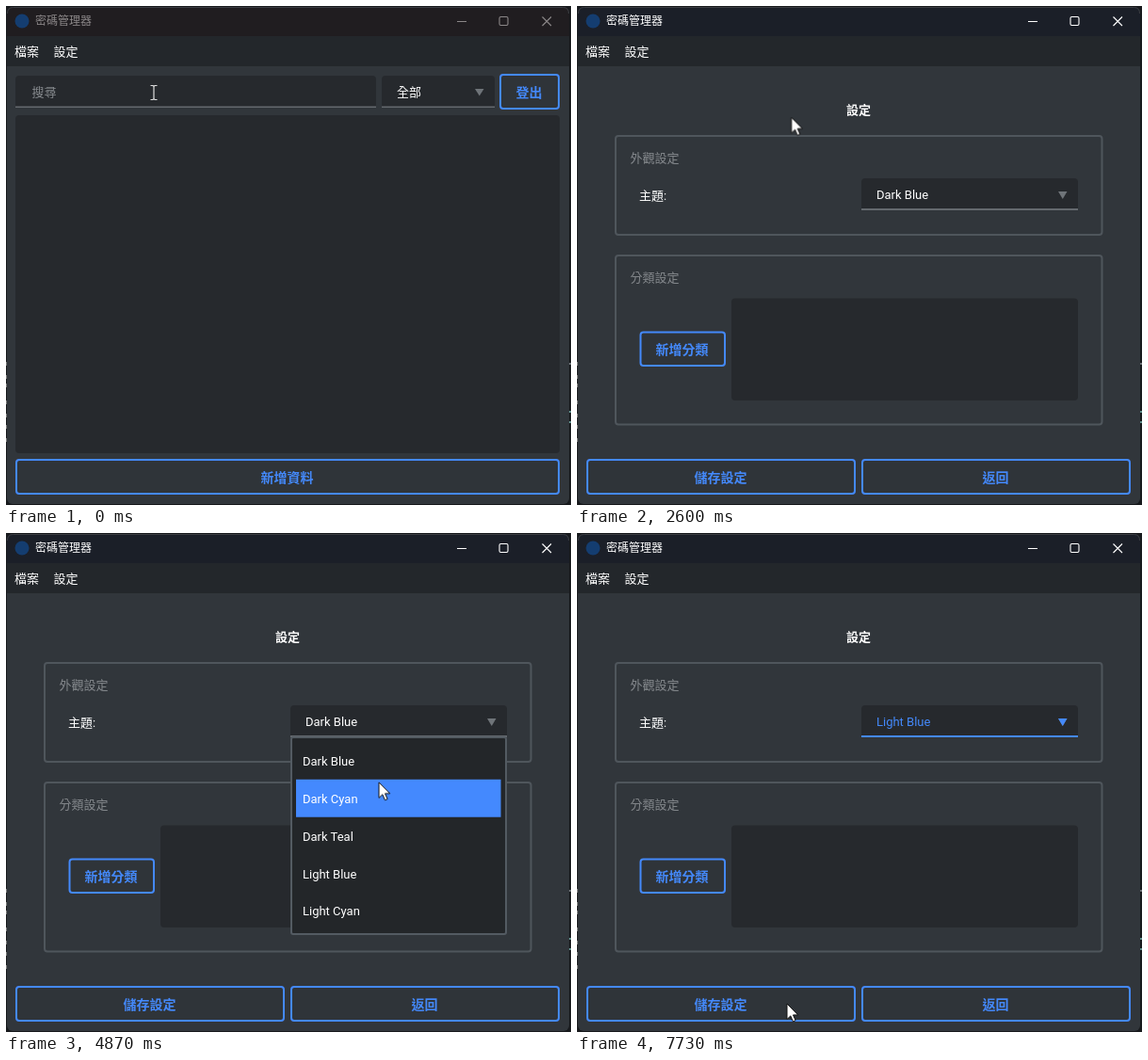
These frames come from a looping animation (600x530 px, 8 s). An HTML page:

```html
<!DOCTYPE html>
<html lang="zh-Hant">
<head>
<meta charset="utf-8">
<title>密碼管理器</title>
<style>
  html, body { margin: 0; width: 100%; height: 100%; overflow: hidden; background: #17191c; }
  svg { display: block; width: 600px; height: 530px; }
  text { font: 13px Roboto, "Noto Sans CJK TC", "Noto Sans CJK", sans-serif; fill: #fff; }
  .bold { font-weight: 700; }
  .mid { text-anchor: middle; }
  .dim { fill: #85898d; }
  .panel { fill: #26292d; }
  .line { fill: #64696e; }
  .arrow { fill: #6f7479; }
  .group { fill: none; stroke: #4f565c; stroke-width: 2; }
  .btn rect { fill: #2f3439; stroke: #4489fb; stroke-width: 2; }
  .btn text { font-size: 14px; font-weight: 700; text-anchor: middle; fill: #4489fb; }
  .hot text, .hot .line, .hot .arrow { fill: #4489fb; }
  .glyphs { fill: none; stroke: #fff; stroke-width: 1.1; }
  .title { font-size: 12px; }
  .idle text { fill: #8b8788; }
  .idle .glyphs { stroke: #8b8788; }

  /* 1% of the loop is 80 ms */
  .t { animation: 8s step-end infinite; }
  .idle { animation-name: idle; }
  .live { animation-name: live; }
  .main { animation-name: main; }
  .prefs { animation-name: prefs; }
  .tab { animation-name: tab; }
  .menu { animation-name: menu; }
  .pick { animation-name: pick; }
  .list { animation-name: list; }
  .row { animation-name: row; }
  .blue { animation-name: blue; }
  .cyanHot { animation-name: cyanHot; }
  .cyan { animation-name: cyan; }
  .light { animation-name: light; }
  .beam { animation-name: beam; }
  .pointer { animation-name: pointer; }
  .move { animation: move 8s linear infinite; }

  @keyframes idle { 0% { visibility: visible } 7.5%, 100% { visibility: hidden } }
  @keyframes live { 0% { visibility: hidden } 7.5%, 100% { visibility: visible } }
  @keyframes main { 0% { visibility: visible } 27.5%, 100% { visibility: hidden } }
  @keyframes prefs { 0% { visibility: hidden } 27.5%, 100% { visibility: visible } }
  @keyframes tab { 0% { visibility: hidden } 5% { visibility: visible } 27.5%, 100% { visibility: hidden } }
  @keyframes menu { 0% { visibility: hidden } 18.375% { visibility: visible } 27.5%, 100% { visibility: hidden } }
  @keyframes pick { 0% { visibility: hidden } 24.2% { visibility: visible } 27.5%, 100% { visibility: hidden } }
  @keyframes list {
    0% { visibility: hidden } 51.6% { visibility: visible } 61.6% { visibility: hidden }
    77.5% { visibility: visible } 80.875%, 100% { visibility: hidden }
  }
  @keyframes row {
    0% { transform: none } 59.1% { transform: translateY(39.75px) }
    78.3% { transform: translateY(79.5px) } 79.1%, 100% { transform: translateY(119.25px) }
  }
  @keyframes blue { 0% { visibility: hidden } 27.5% { visibility: visible } 61.6%, 100% { visibility: hidden } }
  @keyframes cyanHot { 0% { visibility: hidden } 61.6% { visibility: visible } 77.5%, 100% { visibility: hidden } }
  @keyframes cyan { 0% { visibility: hidden } 77.5% { visibility: visible } 80.875%, 100% { visibility: hidden } }
  @keyframes light { 0% { visibility: hidden } 80.875%, 100% { visibility: visible } }
  @keyframes beam { 0% { visibility: visible } 2.5%, 100% { visibility: hidden } }
  @keyframes pointer { 0% { visibility: hidden } 2.5%, 100% { visibility: visible } }
  @keyframes move {
    0%, .875% { transform: translate(157px, 92px) }
    2.5% { transform: translate(128px, 72px) }
    5.2% { transform: translate(70px, 46px) }
    7.5%, 23.375% { transform: translate(63px, 47px) }
    25.8%, 27.4% { transform: translate(84px, 96px) }
    28.375%, 30.8% { transform: translate(88px, 96px) }
    33.4% { transform: translate(300px, 130px) }
    35.9% { transform: translate(463px, 260px) }
    37.8% { transform: translate(420px, 472px) }
    39.3% { transform: translate(250px, 460px) }
    40.875%, 43.3% { transform: translate(175px, 386px) }
    46.6%, 49.1% { transform: translate(399px, 188px) }
    51.6%, 57.4% { transform: translate(401px, 210px) }
    61.6%, 65.87% { transform: translate(395px, 276px) }
    65.875%, 71.62% { transform: translate(395px, 270px) }
    71.625%, 77.4% { transform: translate(406px, 206px) }
    79.1%, 86.62% { transform: translate(404px, 351px) }
    86.625%, 90.87% { transform: translate(398px, 334px) }
    90.875%, 93.3% { transform: translate(377px, 212px) }
    96.6%, 100% { transform: translate(223px, 500px) }
  }
</style>
</head>
<body>
<svg viewBox="0 0 600 530">
  <defs>
    <g id="glyphs">
      <path d="M479 16.5h10M569.5 11.5l9.5 9.5m0-9.5l-9.5 9.5"/>
      <rect x="524" y="11.5" width="9" height="9" rx="1.5"/>
    </g>
    <g id="field">
      <path class="panel" d="M302 217V187q0-4 4-4H528q4 0 4 4V217z"/>
      <rect class="line" x="302" y="215" width="230" height="2"/>
      <path class="arrow" d="M511 197h9.500l-4.750 8z"/>
    </g>
  </defs>

  <!-- window -->
  <rect width="600" height="530" fill="#17191c"/>
  <path d="M0 380h1m-1 14h1m-1 9h1m-1 18h1m-1 14h1m-1 12h1m-1 14h1" stroke="#777" stroke-width="4"/>
  <path d="M598 380h2" stroke="#8a9094" stroke-width="1.500"/>
  <path d="M598 431h2m-2 11h2" stroke="#5f8f8c" stroke-width="2"/>
  <rect x="1" y="1" width="597" height="528" rx="6" fill="#31363b"/>
  <path d="M1 64V32H598V64z" fill="#23272b"/>

  <g class="t idle">
    <path d="M1 32V7q0-6 6-6H592q6 0 6 6V32z" fill="#201d20"/>
    <text class="title" x="31" y="20">密碼管理器</text>
    <use class="glyphs" href="#glyphs"/>
  </g>
  <g class="t live">
    <path d="M1 32V7q0-6 6-6H592q6 0 6 6V32z" fill="#1b1f28"/>
    <text class="title" x="31" y="20">密碼管理器</text>
    <use class="glyphs" href="#glyphs"/>
  </g>
  <path d="M1.500 8q0-6.500 6-6.500H591.500q6 0 6 6.500" fill="none" stroke="#3b3d42"/>
  <circle cx="17" cy="16" r="7.500" fill="#143d70"/>

  <rect class="t tab" x="43" y="32" width="41.500" height="31" fill="#7fb6fc"/>
  <text x="9" y="53">檔案</text>
  <text x="50.500" y="53">設定</text>

  <!-- vault page -->
  <g class="t main">
    <path class="panel" d="M10 108V78q0-4 4-4H389q4 0 4 4V108z"/>
    <rect class="line" x="10" y="106.500" width="383" height="1.500"/>
    <text class="dim" x="27.500" y="96">搜尋</text>
    <path class="panel" d="M399 108V78q0-4 4-4H515q4 0 4 4V108z"/>
    <rect class="line" x="399" y="106.500" width="120" height="1.500"/>
    <text x="415" y="96">全部</text>
    <path class="arrow" d="M498 88h9.500l-4.750 7.500z"/>
    <g class="btn">
      <rect x="525" y="73" width="62" height="36" rx="3"/>
      <text x="555.500" y="97">登出</text>
    </g>
    <rect class="panel" x="10" y="116" width="578" height="359" rx="4"/>
    <g class="btn">
      <rect x="11" y="482" width="576" height="36" rx="3"/>
      <text x="298.500" y="506">新增資料</text>
    </g>
  </g>

  <g class="t menu">
    <rect x="44" y="64.500" width="75" height="44.500" fill="#23272b" stroke="#61778c" stroke-width="1.500"/>
    <rect class="t pick" x="45" y="65.500" width="73" height="42.500" fill="#7fb6fc"/>
    <text x="60" y="92">設定</text>
  </g>

  <!-- settings page -->
  <g class="t prefs">
    <text class="bold mid" x="299" y="115">設定</text>
    <rect class="group" x="41" y="138" width="516.500" height="105" rx="3"/>
    <text class="dim" x="56.500" y="166">外觀設定</text>
    <text x="66" y="206">主題:</text>
    <rect class="group" x="41" y="265" width="516.500" height="179.500" rx="3"/>
    <text class="dim" x="56.500" y="293">分類設定</text>
    <rect class="panel" x="164" y="310.500" width="368" height="108.500" rx="4"/>
    <g class="btn">
      <rect x="67.500" y="346.500" width="89.500" height="35.500" rx="3"/>
      <text x="111.500" y="370">新增分類</text>
      <rect x="11" y="482" width="284" height="36" rx="3"/>
      <text x="152.500" y="506">儲存設定</text>
      <rect x="303" y="482" width="284" height="36" rx="3"/>
      <text x="444.500" y="506">返回</text>
    </g>
  </g>

  <g class="t blue"><use href="#field"/><text x="318" y="204.500">Dark Blue</text></g>
  <g class="t cyan"><use href="#field"/><text x="318" y="204.500">Dark Cyan</text></g>
  <g class="t hot cyanHot">
    <use href="#field"/>
    <rect class="line" x="302" y="215" width="230" height="2"/>
    <path class="arrow" d="M511 197h9.500l-4.750 8z"/>
    <text x="318" y="204.500">Dark Cyan</text>
  </g>
  <g class="t hot light">
    <use href="#field"/>
    <rect class="line" x="302" y="215" width="230" height="2"/>
    <path class="arrow" d="M511 197h9.500l-4.750 8z"/>
    <text x="318" y="204.500">Light Blue</text>
  </g>

  <g class="t list">
    <rect x="303" y="217" width="228" height="209" rx="2" fill="#232629" stroke="#535b62" stroke-width="2"/>
    <rect class="t row" x="308" y="222" width="217.500" height="40" fill="#4489fe"/>
    <text x="315" y="247">Dark Blue</text>
    <text x="315" y="287">Dark Cyan</text>
    <text x="315" y="326.500">Dark Teal</text>
    <text x="315" y="366.500">Light Blue</text>
    <text x="315" y="406">Light Cyan</text>
  </g>

  <g class="move">
    <path class="t beam" d="M-3.500-7.500h2.500l1 1l1-1h2.500M0-7V7M-3.500 7.500h2.500l1-1l1 1h2.500" fill="none" stroke="#ddd" stroke-width="1.200"/>
    <path class="t pointer" d="M0 0V16.500l3.800-3.600 2.600 6 2.700-1.200-2.600-5.800h5.200z" fill="#fff" stroke="#111" stroke-width="1"/>
  </g>
</svg>
</body>
</html>
```
